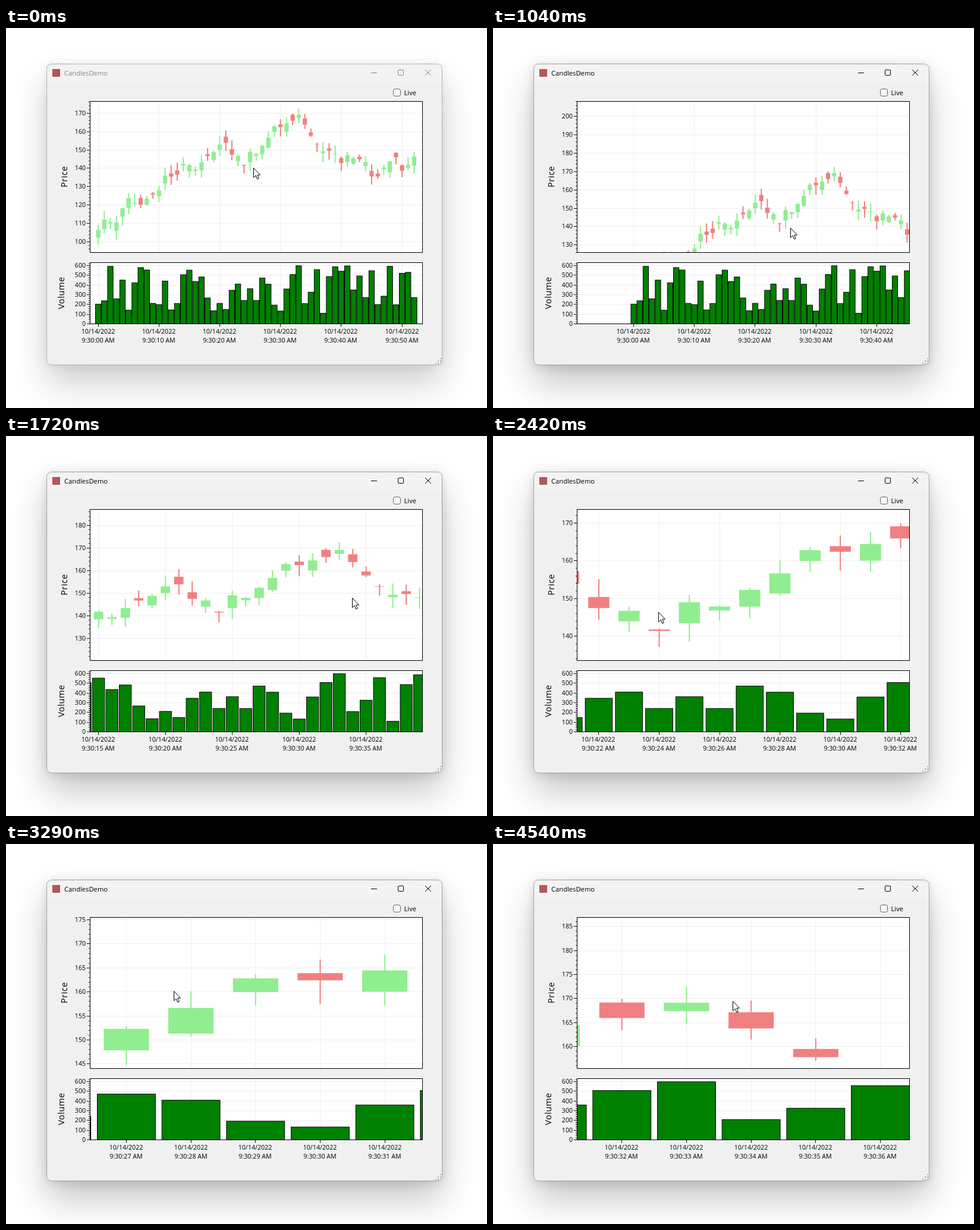
Write an HTML page with a canvas that moves like this. It is 809 px wide and 639 px high and loops after 4.69 s.

```html
<!DOCTYPE html>
<html lang="en">
<head>
<meta charset="utf-8">
<title>CandlesDemo</title>
<style>
  html, body { margin: 0; width: 100%; height: 100%; overflow: hidden; background: #fff; }
  canvas { display: block; width: 809px; height: 639px; }
</style>
</head>
<body>
<canvas id="stage"></canvas>
<script>
const W = 809, H = 639, LOOP = 4690, STEP = 68.5;
const canvas = document.getElementById('stage');
const dpr = window.devicePixelRatio || 1;
canvas.width = W * dpr;
canvas.height = H * dpr;
const ctx = canvas.getContext('2d');
const FONT = '"Open Sans", "Noto Sans", sans-serif';
const UP = '#90ee90', DOWN = '#f08080', GRID = '#efefef';

const PLOT = { x: 141, w: 559, midX: 420.8, midY: 250.5 };
const PRICE = { top: 124, bottom: 377 };
const VOL = { top: 395, bottom: 497 };

// Knuth's subtractive generator
function subtractive(seed) {
  const MAX = 2147483647;
  const wrap = n => n < 0 ? n + MAX : n;
  const s = [];
  let prev = 161803398 - seed, next = 1;
  s[55] = prev;
  for (let i = 1; i < 55; i++) {
    const j = 21 * i % 55;
    s[j] = next;
    next = wrap(prev - next);
    prev = s[j];
  }
  for (let round = 0; round < 4; round++)
    for (let i = 1; i < 56; i++) s[i] = wrap(s[i] - s[1 + (i + 30) % 55]);
  let a = 0, b = 21;
  return () => {
    a = a % 55 + 1;
    b = b % 55 + 1;
    s[a] = wrap(s[a] - s[b]);
    return s[a] / MAX;
  };
}

// Random walk, one candle per second from 9:30:00
function makeCandles(count) {
  const rand = subtractive(0);
  const candles = [];
  let price = 100;
  for (let i = 0; i < count; i++) {
    const open = price + 10 * (rand() - 0.5);
    const close = open + 10 * (rand() - 0.4);
    const low = Math.min(open, close) - 5 * rand();
    const high = Math.max(open, close) + 5 * rand();
    candles.push({ open, close, low, high, volume: 100 + 500 * rand() });
    price = close;
  }
  return candles;
}
const candles = makeCandles(53);

// Mouse stops: step, x, y and what the drag leading there does
const stops = [
  [0, 417, 235],
  [2, 421, 240],
  [6, 232, 246, 'pan'],
  [9.5, 293, 292, 'pan'],
  [10, 306, 309, 'pan'],
  [14.5, 502.5, 338, 'pan'],
  [18.5, 413, 296.5, 'pan'],
  [20, 295, 297],
  [24.7, 588, 272, 'zoom'],
  [28.5, 300, 300],
  [32.5, 604, 228, 'zoom'],
  [34.5, 279, 296],
  [36.5, 279, 296],
  [40.5, 555, 266, 'zoom'],
  [42, 544, 195],
  [47.5, 302, 245, 'pan'],
  [52.5, 150, 262, 'pan'],
  [55.5, 680, 190],
  [62, 303, 265, 'pan'],
  [64.3, 404, 264]
];
const LAG = 0.5; // the charts follow the mouse half a step late

// Monotone cubic through one column of the stops
function track(col, k) {
  const last = stops.length - 1;
  if (k >= stops[last][0]) return stops[last][col];
  let i = 0;
  while (stops[i + 1][0] <= k) i++;
  const rise = j => j < 0 || j >= last ? 0
    : (stops[j + 1][col] - stops[j][col]) / (stops[j + 1][0] - stops[j][0]);
  const slope = j => {
    const a = rise(j - 1), b = rise(j);
    return a * b > 0 ? 2 * a * b / (a + b) : 0;
  };
  const h = stops[i + 1][0] - stops[i][0], u = (k - stops[i][0]) / h;
  const a = stops[i][col], b = stops[i + 1][col];
  return a + (b - a) * u * u * (3 - 2 * u)
    + h * u * (1 - u) * ((1 - u) * slope(i) - u * slope(i + 1));
}

const mouseAt = k => ({ x: track(1, k), y: track(2, k) });
const zoomBy = (d, size) => 10 ** (d / (Math.abs(d) + size));

// Centre and scale of the price chart after all drags up to step k
function viewAt(k) {
  const view = { cx: 26, cy: 135.3, sx: 10.22, sy: 3.09 };
  for (let i = 1; i < stops.length && stops[i - 1][0] < k; i++) {
    const [, x, y] = stops[i - 1], [end, , , action] = stops[i];
    const mouse = mouseAt(Math.min(k, end));
    const dx = mouse.x - x, dy = mouse.y - y;
    if (action === 'pan') {
      view.cx -= dx / view.sx;
      view.cy += dy / view.sy;
    } else if (action === 'zoom') {
      view.sx *= zoomBy(dx, PLOT.w);
      view.sy *= zoomBy(-dy, PRICE.bottom - PRICE.top);
    }
  }
  return view;
}

function line(x1, y1, x2, y2, color, width = 1) {
  ctx.strokeStyle = color;
  ctx.lineWidth = width;
  ctx.beginPath();
  ctx.moveTo(x1, y1);
  ctx.lineTo(x2, y2);
  ctx.stroke();
}

function rect(x, y, w, h, color) {
  ctx.fillStyle = color;
  ctx.fillRect(x, y, w, h);
}

function text(s, x, y, size, align = 'left', color = '#000') {
  ctx.font = `${size}px ${FONT}`;
  ctx.textAlign = align;
  ctx.fillStyle = color;
  ctx.fillText(s, x, y);
}

function sideText(s, x, y) {
  ctx.save();
  ctx.translate(x, y);
  ctx.rotate(-Math.PI / 2);
  ctx.letterSpacing = '0.5px';
  text(s, 0, 0, 14.6, 'center');
  ctx.restore();
}

function rounded(x, y, w, h, r) {
  ctx.beginPath();
  ctx.roundRect(x, y, w, h, r);
}

const crisp = v => Math.floor(v) + 0.5;

// Multiples of step between two values
function multiples(step, from, to) {
  const list = [];
  for (let v = Math.ceil(from / step) * step; v <= to; v += step) list.push(v);
  return list;
}

function clipTo(box, draw) {
  const h = box.bottom - box.top;
  rect(PLOT.x, box.top, PLOT.w, h, '#fff');
  ctx.save();
  ctx.beginPath();
  ctx.rect(PLOT.x, box.top, PLOT.w, h);
  ctx.clip();
  draw();
  ctx.restore();
}

function frame(box) {
  ctx.strokeStyle = '#000';
  ctx.lineWidth = 1;
  ctx.strokeRect(PLOT.x + 0.5, box.top - 0.5, PLOT.w, box.bottom - box.top + 1);
}

function drawShadow(dy, blur, alpha) {
  ctx.save();
  ctx.shadowColor = `rgba(0,0,0,${alpha})`;
  ctx.shadowBlur = blur * dpr;
  ctx.shadowOffsetY = dy * dpr;
  ctx.fillStyle = '#f0f0f0';
  rounded(69, 61, 664, 505, 8);
  ctx.fill();
  ctx.restore();
}

function drawWindow(active) {
  const ink = active ? '#000' : '#858585';
  rect(0, 0, W, H, '#fff');
  drawShadow(30, 58, active ? 0.24 : 0.2);
  drawShadow(2, 18, active ? 0.13 : 0.07);

  rounded(68.5, 60.5, 665, 506, 8);
  ctx.fillStyle = '#f0f0f0';
  ctx.fill();
  ctx.save();
  ctx.clip();
  rect(68, 60, 666, 31, '#f3f3f3');
  ctx.restore();
  ctx.strokeStyle = active ? '#a2a2a2' : '#b0b0b0';
  ctx.lineWidth = 1;
  ctx.stroke();

  rect(78, 69, 13, 13, '#b4565a');
  text('CandlesDemo', 98, 80, 11.2, 'left', ink);
  line(614, 75.5, 624, 75.5, ink);
  rounded(659.5, 70.5, 9, 9, 1.5);
  ctx.stroke();
  line(705, 70, 715, 80, ink);
  line(715, 70, 705, 80, ink);

  rounded(651.5, 102.5, 12, 12, 3);
  ctx.fillStyle = '#f6f6f6';
  ctx.fill();
  ctx.strokeStyle = '#626262';
  ctx.stroke();
  text('Live', 669.5, 113, 11.2);

  for (let r = 0; r < 3; r++)
    for (let c = 2 - r; c < 3; c++) rect(722 + c * 4, 555 + r * 4, 2, 2, '#adadad');
}

// Left axis with five minor ticks per major one
function drawAxis(box, toY, step, from, to) {
  for (const i of multiples(1, from / step * 5, to / step * 5)) {
    const v = i * step / 5, y = crisp(toY(v)), major = i % 5 === 0;
    line(major ? 136 : 139, y, 141, y, '#000');
    if (major) text(String(Math.round(v)), 134, y + 3.5, 10.6, 'right');
  }
}

function drawGrid(box, xs, ys) {
  xs.map(crisp).forEach(x => line(x, box.top, x, box.bottom, GRID));
  ys.map(crisp).forEach(y => line(PLOT.x, y, 700, y, GRID));
}

function drawPrice(view, toX, seconds) {
  const { cy, sx, sy } = view;
  const toY = p => PLOT.midY - (p - cy) * sy;
  const step = 5 * sy > 36 ? 5 : 10;
  const half = 127 / sy;

  clipTo(PRICE, () => {
    drawGrid(PRICE, seconds.map(toX), multiples(step, cy - half, cy + half).map(toY));
    candles.forEach(({ open, close, high, low }, i) => {
      const color = close > open ? UP : DOWN, x = toX(i);
      const h = Math.max(0.8, Math.abs(open - close) * sy);
      line(x, toY(high), x, toY(low), color, 2);
      rect(x - 0.35 * sx, toY(Math.max(open, close)), 0.7 * sx, h, color);
    });
  });
  drawAxis(PRICE, toY, step, cy - half, cy + half);
  frame(PRICE);
  sideText('Price', 103, 250);
}

function clock(s) {
  const all = (9 * 60 + 30) * 60 + s;
  const two = n => String(n).padStart(2, '0');
  return `${Math.floor(all / 3600)}:${two(Math.floor(all / 60) % 60)}:${two(all % 60)} AM`;
}

function drawVolume(view, toX, seconds) {
  const barW = 0.9 * view.sx;
  const toY = v => 497.5 - v * 0.1635;

  clipTo(VOL, () => {
    drawGrid(VOL, seconds.map(toX), multiples(100, 100, 600).map(toY));
    candles.forEach(({ volume }, i) => {
      const x = toX(i) - barW / 2, y = toY(volume);
      rect(x, y, barW, 497.5 - y, '#008000');
      ctx.strokeStyle = '#000';
      ctx.lineWidth = 1;
      ctx.strokeRect(x, y, barW, 497.5 - y);
    });
  });
  drawAxis(VOL, toY, 100, 0, 630);
  seconds.forEach(s => {
    const x = crisp(toX(s));
    line(x, 498, x, 502.5, '#000');
    text('10/14/2022', x - 0.5, 514, 10.7, 'center');
    text(clock(s), x - 0.5, 528.5, 10.7, 'center');
  });
  frame(VOL);
  sideText('Volume', 97.5, 445.5);
}

function drawMouse({ x, y }) {
  const outline = [[0, 0], [0, 16], [3.7, 12.6], [6.2, 18.6], [8.8, 17.5], [6.3, 11.6], [11, 11.6]];
  ctx.beginPath();
  outline.forEach(([dx, dy]) => ctx.lineTo(Math.round(x) + dx - 0.5, Math.round(y) + dy + 0.5));
  ctx.closePath();
  ctx.fillStyle = '#fff';
  ctx.fill();
  ctx.strokeStyle = '#000';
  ctx.lineWidth = 1;
  ctx.stroke();
}

function render(now) {
  const k = Math.floor(now % LOOP / STEP);
  const view = viewAt(k - LAG);
  const { cx, sx } = view;
  const toX = s => PLOT.midX + (s - cx) * sx;
  const step = [1, 2, 5].find(s => s * sx >= 70) || 10;
  const half = PLOT.w / 2 / sx;
  const seconds = multiples(step, cx - half, cx + half);

  ctx.setTransform(dpr, 0, 0, dpr, 0, 0);
  drawWindow(k > 0);
  drawPrice(view, toX, seconds);
  drawVolume(view, toX, seconds);
  drawMouse(mouseAt(k));
}

const start = performance.now();
function tick() {
  render(performance.now() - start);
  requestAnimationFrame(tick);
}
tick();
</script>
</body>
</html>
```
